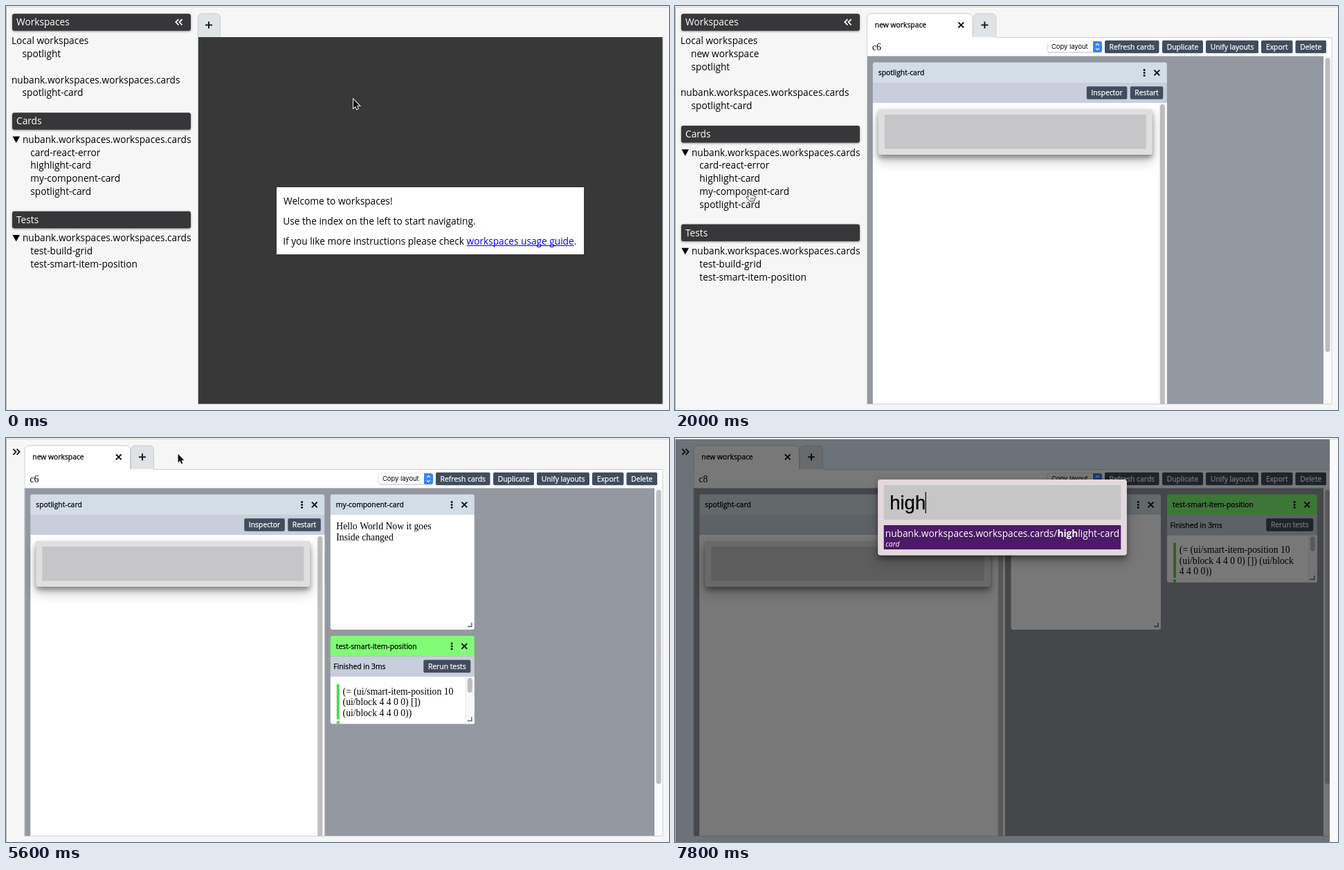
An HTML page with a canvas for the animation above (8 s loop, 958 by 584 pixels).

```html
<!DOCTYPE html>
<html lang="en">
<head>
<meta charset="utf-8">
<title>Workspaces</title>
<style>
html, body { margin: 0; width: 100%; height: 100%; overflow: hidden; background: #f6f6f6; }
canvas { display: block; }
</style>
</head>
<body>
<canvas id="stage" width="958" height="584"></canvas>
<script>
const ctx = document.getElementById('stage').getContext('2d');
const LOOP = 8000;
const UI = '"Open Sans", sans-serif';
const SERIF = '"Liberation Serif", serif';
const SANS = '"Liberation Sans", sans-serif';
const BIG = 13.7, SMALL = 10.35, LINE = 18.75;
const DARK = '#373739', BUTTON = '#414d5d', INK = '#000';
const NS = 'nubank.workspaces.workspaces.cards';

// Moments at which the interface changes
const T = { open: 1470, card: 1530, second: 2530, test: 3800, fold: 5600, widen: 5730, modal: 6470, caretOff: 7000, type: 7470 };

const PATH = [
  [0, 502, 135], [200, 502, 135], [1000, 114, 266], [1070, 114, 266], [1130, 111, 267],
  [1530, 111, 267], [2000, 107, 269], [2800, 107, 269], [3470, 129, 391], [3840, 129, 391],
  [4330, 475.5, 341], [4600, 475.5, 341], [5330, 249, 24], [5600, 248.5, 23],
  [5730, 248.5, 23], [6200, 357, 221], [LOOP, 357, 221]
];
const HAND = [[900, 3900], [5250, 5600], [6470, 7470]];

const ENTRIES = [
  ['new workspace', 'workspace'],
  ['nubank.workspaces.card-types.test/test-all', 'test'],
  [NS, 'test'],
  [NS + '/card-react-error', 'card'],
  [NS + '/highlight-card', 'card'],
  [NS + '/my-component-card', 'card'],
  [NS + '/spotlight-card', 'card'],
  [NS + '/spotlight-card', 'workspace'],
  [NS + '/test-build-grid', 'test'],
  [NS + '/test-smart-item-position', 'test'],
  ['spotlight', 'workspace']
];

const ease = p => p * p * (3 - 2 * p);
const mix = (a, b, p) => a + (b - a) * p;
const clamp = p => Math.max(0, Math.min(1, p));

function rect(x1, y1, x2, y2, color, radius = 0) {
  ctx.fillStyle = color;
  ctx.beginPath();
  ctx.roundRect(x1, y1, x2 - x1, y2 - y1, radius);
  ctx.fill();
}

function shadowed(blur, dy, color, draw) {
  ctx.save();
  ctx.shadowBlur = blur;
  ctx.shadowOffsetY = dy;
  ctx.shadowColor = color;
  draw();
  ctx.restore();
}

// Box with a wide soft shadow and a tighter one below it
function raised(...box) {
  const draw = () => rect(...box);
  shadowed(17, 8.6, 'rgba(0,0,0,.25)', draw);
  shadowed(6, 4.5, 'rgba(0,0,0,.33)', draw);
}

function lines(color, width, ...paths) {
  ctx.strokeStyle = color;
  ctx.lineWidth = width;
  ctx.beginPath();
  for (const [first, ...rest] of paths) {
    ctx.moveTo(...first);
    rest.forEach(p => ctx.lineTo(...p));
  }
  ctx.stroke();
}

function measure(str, size, family, style = '') {
  ctx.font = `${style} ${size}px ${family}`;
  return ctx.measureText(str).width;
}

// y is the middle of the line; returns the right end of the text
function text(str, x, y, { size = BIG, family = UI, style = '', color = INK, align = 'left', heavy = 0 } = {}) {
  const width = measure(str, size, family, style);
  ctx.textAlign = align;
  ctx.fillStyle = color;
  const base = y + size * 0.36;
  ctx.fillText(str, x, base);
  if (heavy) {
    ctx.strokeStyle = color;
    ctx.lineWidth = heavy;
    ctx.strokeText(str, x, base);
  }
  return x + width;
}

const label = (str, x, y) => text(str, x, y, { size: SMALL, heavy: 0.25 });
const serif = (str, x, y) => text(str, x, y, { size: 13.7, family: SERIF });

function button(str, x1, x2, y, h = 18.5) {
  rect(x1, y, x2, y + h, BUTTON, 2);
  text(str, (x1 + x2) / 2, y + h / 2, { size: SMALL, color: '#fff', align: 'center', heavy: 0.25 });
}

function cross(x, y) {
  const r = 3.9;
  lines('#111', 2, [[x - r, y - r], [x + r, y + r]], [[x + r, y - r], [x - r, y + r]]);
}

function plus(x, y) {
  lines('#1c1c1e', 2, [[x - 5, y], [x + 5, y]], [[x, y - 5], [x, y + 5]]);
}

function chevrons(x, y, dir, color) {
  const one = dx => [[x + dx - 2 * dir, y - 4.2], [x + dx + 2 * dir, y], [x + dx - 2 * dir, y + 4.2]];
  lines(color, 1.8, one(-2.6), one(2.6));
}

function bar(title, y) {
  shadowed(3, 1, 'rgba(0,0,0,.45)', () => rect(9, y, 267, y + 24.5, DARK, 3));
  text(title, 15, y + 12.2, { color: '#fff' });
}

function group(y, names) {
  ctx.fillStyle = INK;
  ctx.beginPath();
  ctx.moveTo(9.5, y - 4.5);
  ctx.lineTo(20, y - 4.5);
  ctx.lineTo(14.7, y + 5);
  ctx.fill();
  text(NS, 23.9, y);
  names.forEach((name, i) => text(name, 35.3, y + LINE * (i + 1)));
}

function sidebar(opened) {
  bar('Workspaces', 11.3);
  chevrons(250, 23.3, -1, '#fff');
  text('Local workspaces', 7.9, 50.5);
  const dy = opened ? LINE : 0;
  if (opened) text('new workspace', 23, 69.3);
  text('spotlight', 23.5, 69.3 + dy);
  text(NS, 7.9, 106.8 + dy);
  text('spotlight-card', 23.5, 125.5 + dy);
  bar('Cards', 154.3 + dy);
  group(193 + dy, ['card-react-error', 'highlight-card', 'my-component-card', 'spotlight-card']);
  bar('Tests', 296.8 + dy);
  group(335.5 + dy, ['test-build-grid', 'test-smart-item-position']);
}

function tab(x1, x2, color) {
  rect(x1, 11, x2, 46, color, [6, 6, 0, 0]);
  ctx.strokeStyle = '#c9ced2';
  ctx.lineWidth = 1;
  ctx.stroke();
}

function welcome() {
  tab(277.5, 309.5, '#dfe4e5');
  plus(293, 27.5);
  rect(277, 45, 949, 575.5, '#383839');
  lines('#b9bfc2', 1, [[277, 45.5], [277.5, 45.5], [277.5, 575.5], [949, 575.5], [949, 45]]);
  rect(391, 262, 835, 359, '#fff');
  text('Welcome to workspaces!', 401, 281.7);
  text('Use the index on the left to start navigating.', 400.2, 310.7);
  const x = text('If you like more instructions please check ', 400.2, 339.7);
  const end = text('workspaces usage guide', x, 339.7, { color: '#0000ee' });
  lines('#0000ee', 1, [[x, 346.5], [end, 346.5]]);
  text('.', end, 339.7);
}

function cardHead(title, x, right, y, color) {
  rect(x, y, right, y + 29.5, color, [3, 3, 0, 0]);
  label(title, x + 8, y + 15);
  ctx.fillStyle = '#111';
  for (const dy of [-4, 0, 4]) {
    ctx.beginPath();
    ctx.arc(right - 32.7, y + 15 + dy, 1.5, 0, 7);
    ctx.fill();
  }
  cross(right - 14.5, y + 15);
}

function corner(right, bottom) {
  lines('#555', 1.3, [[right - 4, bottom - 10], [right - 4, bottom - 4.5], [right - 10, bottom - 4.5]]);
}

function spotlightCard(x, right) {
  cardHead('spotlight-card', x, right, 81.5, '#d3dde5');
  rect(x, 111, right, 140, '#c8cedb');
  button('Inspector', right - 116, right - 57.5, 116.3);
  button('Restart', right - 53, right - 5.5, 116.3);
  rect(x, 140, right, 576, '#fff');
  rect(right - 12.5, 140, right, 576, '#f8f8f8');
  rect(right - 10, 142, right - 3, 590, '#bdbdbe', 3.5);
  raised(x + 8, 149, right - 21, 215, '#dfdfe0', 3);
  rect(x + 17, 157, right - 30, 206.5, '#c6c6c8');
}

function componentCard(x, right) {
  cardHead('my-component-card', x, right, 81.5, '#d3dde5');
  rect(x, 111, right, 277, '#fff', [0, 0, 3, 3]);
  serif('Hello World Now it goes', x + 8.5, 127.3);
  serif('Inside changed', x + 8.5, 142.8);
  corner(right, 277);
}

function testCard(x, right, y, wide) {
  const bottom = y + 127.3;
  cardHead('test-smart-item-position', x, right, y, '#80fd75');
  rect(x, y + 29.5, right, y + 59, '#c8cedb');
  label('Finished in 3ms', x + 4.5, y + 44.5);
  button('Rerun tests', right - 73.5, right - 5.5, y + 34.7);
  rect(x, y + 59, right, bottom, '#fff', [0, 0, 3, 3]);
  rect(x + 9, y + 70, x + 13, y + 120.5, '#58d356');
  rect(x + 9, y + 123, x + 13, bottom, '#58d356');
  const code = wide
    ? ['(= (ui/smart-item-position 10', '(ui/block 4 4 0 0) []) (ui/block', '4 4 0 0))']
    : ['(= (ui/smart-item-position 10', '(ui/block 4 4 0 0) [])', '(ui/block 4 4 0 0))'];
  code.forEach((row, i) => serif(row, x + 17.8, y + 79.8 + i * 15.5));
  rect(right - 12.5, y + 59, right, bottom, '#f8f8f8');
  lines('#e6e6e6', 1, [[right - 12.5, y + 59], [right - 12.5, bottom]]);
  rect(right - 10, y + 61, right - 3, y + 82, '#bdbdbe', 3.5);
  corner(right, bottom);
}

function toolbar(left) {
  rect(left, 45, 949, 72.5, '#fff');
  shadowed(2, 0.5, 'rgba(0,0,0,.4)', () => rect(538.5, 51.3, 616.5, 66.5, '#fff', 3));
  rect(604, 51, 617, 67, '#3a84f6', [0, 3, 3, 0]);
  lines('#fff', 1.2, [[608, 57.2], [610.5, 54.6], [613, 57.2]], [[608, 60.8], [610.5, 63.4], [613, 60.8]]);
  text('Copy layout', 544, 59, { size: 9.4, family: 'Inter, sans-serif' });
  button('Refresh cards', 621, 699.5, 49.7);
  button('Duplicate', 704, 763, 49.7);
  button('Unify layouts', 767, 843, 49.7);
  button('Export', 847, 892.5, 49.7);
  button('Delete', 896.5, 941, 49.7);
}

function workspace(t) {
  const left = t < T.fold ? 277 : 26.5;
  const wide = t >= T.widen;
  const p = ease(clamp((t - T.widen) / 200));
  tab(left + 0.5, left + 153, '#fff');
  label('new workspace', left + 11.8, 27.5);
  cross(left + 136.3, 27.5);
  tab(left + 154, left + 187, '#dfe3e5');
  plus(left + 170.5, 27.5);
  toolbar(left);
  rect(left, 72.5, 937, 575.5, '#9498a0');
  rect(937, 72.5, 949, 575.5, '#fafafa');
  if (t >= T.card) {
    serif(wide ? 'c8' : 'c6', left + 8, 59);
    rect(939.5, 75, 946.5, 500, '#bdbdbe', 3.5);
    ctx.save();
    ctx.beginPath();
    ctx.rect(left, 72.5, 911, 503);
    ctx.clip();
    spotlightCard(left + 8.8, left + mix(433.8, 450.5, p));
    if (t >= T.second) componentCard(left + mix(442.3, 459, p), left + mix(650.3, 675.5, p));
    if (t >= T.test) testCard(left + mix(442.3, 684.5, p), left + mix(650.3, 901.3, p), mix(286, 81.5, p), wide);
    ctx.restore();
  }
  lines('#cdd2d8', 1, [[left + 0.5, 45], [left + 0.5, 575.5], [949, 575.5], [949, 45.5], [left + 187, 45.5]]);
}

function query(t) {
  return 'high'.slice(0, [T.type, 7600, 7670, 7800].filter(at => t >= at).length);
}

// Splits a name around the matched letters
function pieces(name, q) {
  const at = name.indexOf(q);
  return [[name.slice(0, at), ''], [q, 'bold'], [name.slice(at + q.length), '']];
}

function modal(t) {
  rect(0, 2, 946, 584, 'rgba(0,0,0,.53)');
  rect(946, 2, 958, 584, '#f9f9f9');
  const q = query(t);
  const found = ENTRIES.filter(([name]) => name.includes(q));
  const widths = found.map(([name]) =>
    pieces(name, q).reduce((sum, [part, style]) => sum + measure(part, BIG, UI, style), 0));
  const half = Math.max(...widths) / 2 + 10.6;
  const x1 = 473 - half, x2 = 473 + half;
  raised(x1, 60, x2, 134.5 + found.length * 34.95, '#e3d8de', 4);
  rect(x1 + 8.5, 68, x2 - 8.5, 118, '#c6c6c7');
  const end = text(q, x1 + 17, 93, { size: 27.5, family: SANS, heavy: 0.3 });
  if (t < T.caretOff || t >= T.type) rect(end - 0.5, 78, end + 0.7, 109, INK);

  found.forEach(([name, kind], i) => {
    const y = 126 + i * 34.95;
    const picked = q && i === 0;
    const color = picked ? '#fff' : INK;
    if (picked) rect(x1 + 8.5, y, x2 - 8.5, y + 35, '#4c1a67');
    let x = x1 + 10.6;
    for (const [part, style] of pieces(name, q)) x = text(part, x, y + 12, { color, style });
    text(kind, x1 + 11, y + 27.5, { color, size: 10.3, style: 'italic' });
  });
}

function arrow() {
  ctx.beginPath();
  [[0, 0], [0, 12.6], [2.9, 10], [4.8, 14.3], [6.9, 13.4], [5, 9.2], [8.9, 9.2]]
    .forEach(p => ctx.lineTo(...p));
  ctx.closePath();
  ctx.fillStyle = '#111';
  ctx.strokeStyle = '#fff';
  ctx.lineWidth = 1.8;
  ctx.stroke();
  ctx.fill();
}

function hand() {
  ctx.beginPath();
  ctx.moveTo(-1.6, 1);
  ctx.quadraticCurveTo(0, -1.5, 1.2, 1);
  ctx.lineTo(2, 4.2);
  ctx.quadraticCurveTo(4, 3, 4.8, 4.7);
  ctx.quadraticCurveTo(7, 4, 7.4, 5.6);
  ctx.quadraticCurveTo(9, 5.4, 9, 7.4);
  ctx.lineTo(7.6, 13);
  ctx.lineTo(1, 13);
  ctx.lineTo(-3.8, 8);
  ctx.quadraticCurveTo(-3.8, 5.6, -1, 7.4);
  ctx.closePath();
  ctx.fillStyle = '#fff';
  ctx.fill();
  ctx.strokeStyle = '#333';
  ctx.lineWidth = 1;
  ctx.stroke();
  lines('#333', 0.7, [[2.4, 8], [2.5, 11]], [[4.3, 8], [4.3, 11]], [[6.2, 8], [6.1, 11]]);
}

function cursor(t) {
  if (t >= T.type) return;
  const i = PATH.findIndex(([at]) => at > t);
  const [t0, x0, y0] = PATH[i - 1], [t1, x1, y1] = PATH[i];
  const p = ease((t - t0) / (t1 - t0));
  ctx.save();
  ctx.translate(mix(x0, x1, p), mix(y0, y1, p));
  if (HAND.some(([from, to]) => t >= from && t < to)) hand();
  else arrow();
  ctx.restore();
}

function draw(t) {
  rect(0, 0, 958, 584, t < T.modal ? '#f6f6f6' : '#e6f6ff');
  rect(0, 0, 958, 2, '#fbfbfb');
  lines('#cfcfcf', 1, [[0, 1.5], [958, 1.5]]);
  if (t < T.fold) sidebar(t >= T.open);
  else chevrons(15, 20, 1, '#111');
  if (t < T.open) welcome();
  else workspace(t);
  if (t >= T.modal) modal(t);
  lines('#b4b4b4', 1, [[0.5, 2], [0.5, 584]]);
  cursor(t);
}

const start = performance.now();
function tick() {
  draw((performance.now() - start) % LOOP);
  requestAnimationFrame(tick);
}
tick();
</script>
</body>
</html>
```
